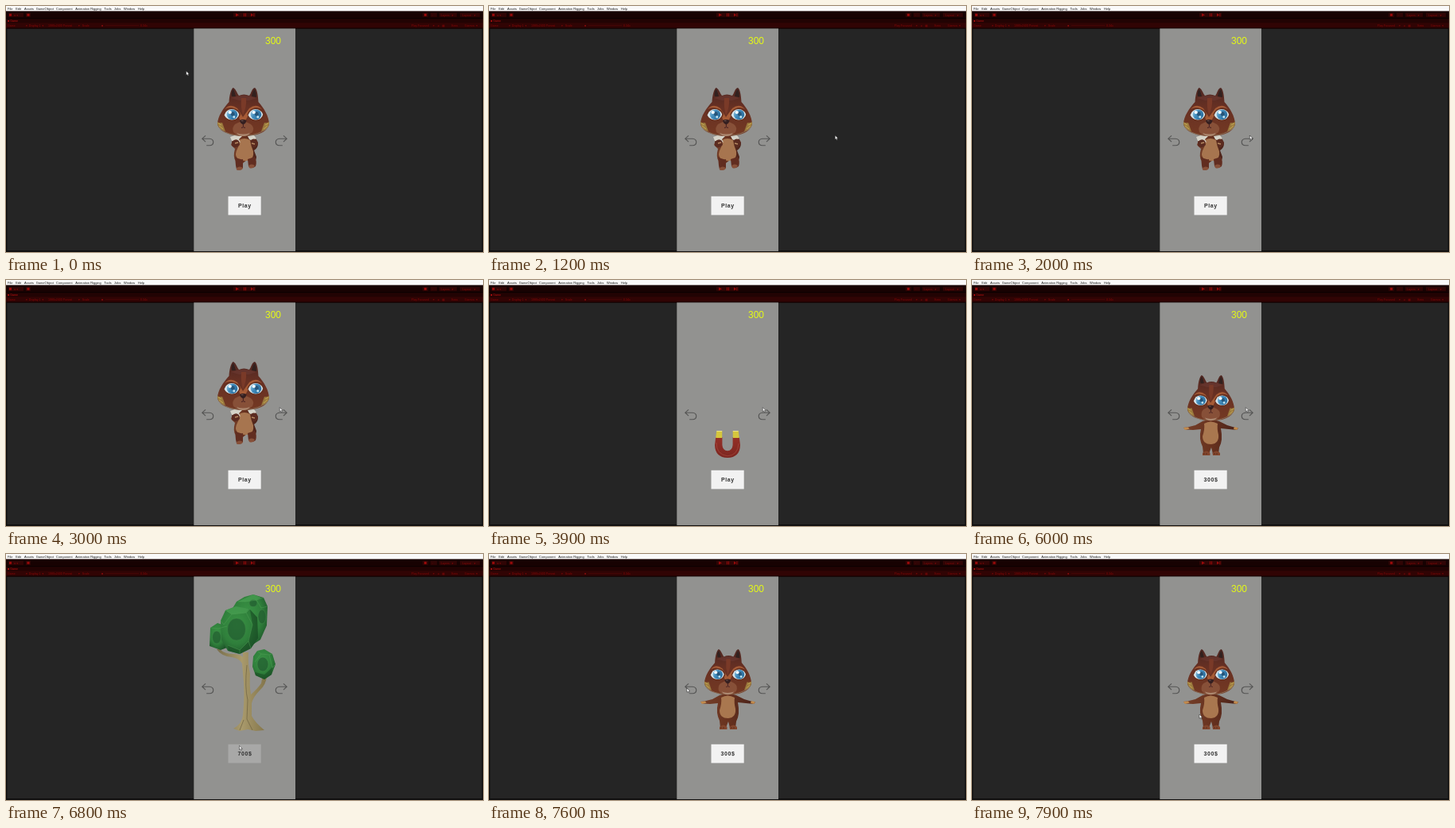
An HTML page that plays this animation: 600 px wide and 310 px high, repeating every 8000 ms.

```html
<!DOCTYPE html>
<html lang="en">
<head>
<meta charset="utf-8">
<title>Character shop</title>
<style>
  html, body { margin: 0; width: 100%; height: 100%; overflow: hidden; background: #252525; }
  svg { display: block; width: 600px; height: 310px; }
  text { font-family: "Liberation Sans", Arial, sans-serif; white-space: pre; }
  .menu { font: 4px "Open Sans", "Noto Sans", sans-serif; fill: #111; }
  .bar { font-size: 3.6px; fill: #850808; }
  .label { font-size: 7px; font-weight: 700; letter-spacing: .6px; text-anchor: middle; fill: #303030; }
  .item { display: none; }
</style>
</head>
<body>
<svg viewBox="0 0 600 310">
  <defs>
    <linearGradient id="fur" x2="0" y2="1">
      <stop offset="0" stop-color="#4d2722"/><stop offset=".4" stop-color="#673023"/><stop offset="1" stop-color="#743923"/>
    </linearGradient>
    <linearGradient id="limb">
      <stop offset="0" stop-color="#75402a"/><stop offset=".5" stop-color="#68321f"/><stop offset="1" stop-color="#472119"/>
    </linearGradient>
    <linearGradient id="iris" x2="1" y2=".5">
      <stop offset="0" stop-color="#9bd0e8"/><stop offset=".45" stop-color="#438dbd"/><stop offset="1" stop-color="#2a6f9f"/>
    </linearGradient>
    <linearGradient id="bark">
      <stop offset="0" stop-color="#786e4c"/><stop offset=".5" stop-color="#a99a6c"/><stop offset="1" stop-color="#827449"/>
    </linearGradient>
    <radialGradient id="leaf" cx=".43" cy=".38" r=".68">
      <stop offset="0" stop-color="#3a9445"/><stop offset=".6" stop-color="#2f7f3b"/><stop offset="1" stop-color="#1d5429"/>
    </radialGradient>
    <linearGradient id="steel" x2="0" y2="1">
      <stop offset="0" stop-color="#953027"/><stop offset="1" stop-color="#7c2620"/>
    </linearGradient>

    <g id="eye">
      <path d="M-10.5 0Q-8-8 1-8Q9-7 11 0Q9 8 0 8.5Q-8 8-10.5 0Z" fill="#65301f"/>
      <path d="M-9.4 1Q-7-6.5 0-6.5Q7-6 9.2 0Q8 6.5 0 7Q-7 6.5-9.4 1Z" fill="#d5e3e9"/>
      <ellipse cx=".5" cy=".3" rx="6.8" ry="6.4" fill="url(#iris)"/>
      <ellipse cx="1.3" cy="-.6" rx="2.4" ry="2.7" fill="#275579"/>
      <ellipse cx="-2.3" cy="-2.4" rx="2.2" ry="2" fill="#f2faff"/>
      <circle cx="2.8" cy="3.3" r="1.5" fill="#c5e7f5"/>
    </g>

    <g id="head">
      <path d="M280.5 121C281 112 283 105 285.5 103C289 104 290 109 293 113Q299 110 306 113C309 109 309 104 313 103C316 105 317 113 317.5 121C324 128 331 139 331 149C329 157 320 162 310 163Q299 165 287 163C277 161 268 157 266 149C266 139 274 128 280.5 121Z" fill="url(#fur)"/>
      <path d="M284 114Q283 107 286 105Q288 109 289 114ZM309 114Q310 107 313 105Q315 109 315 115Z" fill="#32211f"/>
      <path d="M283 116Q299 109 315 116L306 119H293Z" fill="#6a3731" opacity=".7"/>
      <path d="M266 146Q269 148 272 147L276 158Q268 156 266 149ZM331 146Q327 148 325 147L321 158Q329 156 331 149Z" fill="#9a793d"/>
      <path d="M268 151l5 4M329 151l-5 4M267 148l4 2M330 148l-4 2" stroke="#cfb45c" stroke-width=".8"/>
      <path d="M268 153Q274 160 287 162.5Q299 164 310 162.5Q324 159 329 153" fill="none" stroke="#999078" stroke-width=".9" opacity=".65"/>
      <path d="M275 130Q282 122 291 129L298 140L306 129Q315 122 322 130Q312 125 307 133L301 145H295L290 133Q284 125 275 130Z" fill="#a65b36"/>
      <path d="M296 116Q295 127 298 138Q303 127 302 116Z" fill="#7a3a28"/>
      <use href="#eye" x="284" y="136.5"/>
      <use href="#eye" x="314" y="136.5"/>
      <path d="M288 149Q298 142 308 149Q313 153 310 159Q306 163 298 163.5Q290 163 286 159Q284 153 288 149Z" fill="#875038"/>
      <path d="M290 160Q298 163 307 160Q304 164 298 164Q293 164 290 160Z" fill="#ac8870"/>
      <path d="M294 144Q298 142 302.5 144Q302 148 298.4 149.5Q294.5 148 294 144Z" fill="#341f20"/>
      <path d="M298.4 149V152M296 153.5Q298.5 152 301 153.5" fill="none" stroke="#451f20" stroke-width="1"/>
      <path d="M296 144.7h2.6" stroke="#8a7068" stroke-width=".7"/>
    </g>

    <path id="arrow" fill="none" stroke="#555554" stroke-width="1.15" d="M251 163.3L246.8 167.2L251 171.2M247 167.2H256Q260.7 167.5 260.7 171.5Q260.7 175.7 256 175.7H252.2"/>

    <g id="horseshoe">
      <path d="M285.2 198H293.4V208Q294 215 300 215.3Q306 215 306.6 208V198H314.8L316 208Q315.5 223.7 300 224Q284.5 223.7 284 208Z" fill="url(#steel)"/>
      <path d="M285.2 199L286.3 190H293.3L293.2 199ZM306.8 199L306.7 190H313.7L314.8 199Z" fill="#d5c63d"/>
      <path d="M286.4 190.5h6.7M306.9 190.5h6.7" stroke="#ebe48a"/>
      <path d="M286 205Q286 220 300 221.8Q313 221 314 206" fill="none" stroke="#b45449" stroke-width=".8" opacity=".65"/>
    </g>
  </defs>

  <rect width="600" height="310" fill="#252525"/>
  <rect y="6" width="600" height="22.5" fill="#170202"/>
  <rect y="15.7" width="600" height="5.5" fill="#220303"/>
  <rect y="21.2" width="600" height="7" fill="#310404"/>
  <path d="M0 15.6H600M0 28H600" stroke="#080000" stroke-width=".8"/>
  <rect width="600" height="6.4" fill="#fafafa"/>
  <path d="M.5 28V310M599.5 28V310M0 309H600" stroke="#0b0a0a" stroke-width="1.5"/>
  <g id="menu" class="menu"></g>
  <g class="bar">
    <path d="M3 8.7h19v5H3ZM25 8.7h6v5h-6ZM286 8.7h28v5h-28ZM524 8.7h7v5h-7ZM534 8.7h8v5h-8ZM545 8.7h22v5h-22ZM571 8.7h25v5h-25Z" fill="#300505"/>
    <path d="M4 9.7h3v3H4ZM26.5 9.7h3v3h-3ZM289 9.3l4 2-4 2ZM299 9.3h1v4h-1ZM301 9.3h1v4h-1ZM308 9.3l3 2-3 2ZM311.5 9.3h.8v4h-.8ZM526 9.7h3v3h-3Z" fill="#9a0a0a"/>
    <text x="10" y="12.6">● ▾</text>
    <text x="536" y="12.6">◦</text>
    <text x="547" y="12.6">Layers   ▾</text>
    <text x="574" y="12.6">Layout    ▾</text>
    <text x="2" y="20" fill="#c51212">■ Game</text>
    <text x="2" y="25.8">Game</text>
    <text x="25" y="25.8">▾  Display 1  ▾</text>
    <text x="53" y="25.8">1080x2400 Portrait</text>
    <text x="91" y="25.8">▾   Scale</text>
    <text x="120" y="25.8" fill="#c51212">●</text>
    <path d="M125 24.5h42" stroke="#4b0707" stroke-width=".7"/>
    <text x="169" y="25.8">0.34x</text>
    <text x="510" y="25.8">Play Focused</text>
    <text x="537" y="25.8">▾    ◂    ▦</text>
    <text x="560" y="25.8">Stats</text>
    <text x="577" y="25.8">Gizmos  ▾</text>
  </g>

  <rect x="236.3" y="28.4" width="127.7" height="280.6" fill="#929290"/>
  <text x="326" y="47.6" font-size="12" fill="#e5fa14">300</text>

  <g class="item" id="idle">
    <path d="M286 166Q299 160 314 166L317 173Q317 179 312 182L315 190Q315 195 311 197L303 194L298 198Q293 199 289 195Q285 191 288 180L283 175Z" fill="url(#limb)"/>
    <path d="M293 169Q300 165 307 169Q308 176 311 183Q312 191 307 194Q299 197 291 192Q287 187 291 180Q294 175 293 169Z" fill="#a7754f"/>
    <path d="M282 165L288 163L297 164L293 168L295 172L290 170L284 170ZM304 164L312 163L315 167L310 170L306 168Z" fill="#d5d3c8"/>
    <path d="M284 171Q289 166 293 170L294 175Q289 181 284 176ZM308 169Q314 165 317 172Q316 179 310 178Z" fill="#5b2b20"/>
    <path d="M288 173l4-1M309 173l4 1" stroke="#b68962" stroke-width="1.3"/>
    <path d="M288 190Q293 194 298 193L298 204Q295 208 290 206L289 201ZM304 193L313 190Q316 196 314 202Q309 206 305 202Z" fill="#612d20"/>
    <path d="M290 204Q294 201 298 204Q297 208 290 206.5ZM305 201Q309 198 313 201Q311 206 306 204Z" fill="#875039"/>
    <use href="#head"/>
  </g>

  <g class="item" id="magnet"><use href="#horseshoe"/></g>
  <g class="item" id="bigMagnet"><use href="#horseshoe" transform="translate(300 226) scale(1.42) translate(-300 -224)"/></g>

  <g class="item" id="pose">
    <path d="M290 178Q301 174 311 178L321 183L331 186L335 186.5L333 189L323 188L313 187Q316 202 311 211L310 219H303L301 211L298 219H291L290 210Q285 200 288 188L278 189L268 188.5L266 186L271 185.5L281 183Z" fill="url(#limb)"/>
    <path d="M266 186l6-.5 1.5 2-5.5 1.5ZM330 185l5 1.5-2 2.5-4-1Z" fill="#c28b4d"/>
    <path d="M292 181Q300 176 309 181Q308 187 310 195Q311 206 301 207Q290 207 290 197Q293 188 292 181Z" fill="#a9774f"/>
    <path d="M290 218Q295 213 299.5 218V221H290ZM302.5 218Q308 213 312 218V221H303Z" fill="#82452c"/>
    <path d="M292 220v-2M295 220v-2M305 220v-2M308 220v-2" stroke="#3f2018" stroke-width=".6"/>
    <use href="#head" transform="translate(300.5 120) scale(.91 .94) translate(-298.5 -103)"/>
  </g>

  <g class="item" id="tree">
    <path d="M298 124H305Q304 138 307 151Q306 165 308 177Q317 169 321 163L323 152L328 154Q327 165 319 172Q311 180 309 188L309 204Q313 212 325 222L314 223L304 221L294 223L286 220Q297 214 298 203Q301 175 298 150L297 138Q293 131 284 130Q271 129 265 120L269 120Q275 126 286 126Q294 126 298 130Z" fill="url(#bark)"/>
    <path d="M303 140Q300 168 304 184L303 208L310 222M299 209L294 222" fill="none" stroke="#665c3d" stroke-width=".9" opacity=".7"/>
    <path d="M257 93L266 87L278 91V118L270 121L256 116Z" fill="url(#leaf)"/>
    <path d="M284 70L290 60L300 54L311 51L324 55L329 66L328 90L320 108L306 117L291 101Z" fill="url(#leaf)"/>
    <path d="M270 84L276 71L289 66L306 69L316 80L317 106L308 119L294 126L279 122L271 108Z" fill="url(#leaf)"/>
    <path d="M311 129L316 122L325 120L335 126L339 139L334 152L325 158L314 153L310 142Z" fill="url(#leaf)"/>
    <path d="M307 70L316 80L317 106L308 119L305 109L310 89ZM279 115L294 121L305 110L308 119L294 126L280 122ZM313 149L325 152L335 143L334 152L325 158L314 153Z" fill="#184b24" opacity=".55"/>
    <path d="M276 71L289 66L306 69L302 74L284 76ZM292 60L311 51L321 55L315 58L301 60Z" fill="#4ba253" opacity=".65"/>
    <g fill="#235f31" opacity=".75" stroke="#499350" stroke-width=".45">
      <ellipse cx="290" cy="95" rx="11.5" ry="14"/><ellipse cx="311" cy="62" rx="5" ry="4.6"/>
      <ellipse cx="322" cy="79" rx="5" ry="9"/><ellipse cx="265" cy="105" rx="5.5" ry="8"/>
      <ellipse cx="323" cy="139" rx="7" ry="9"/>
    </g>
    <path d="M277 71L284 76L302 74L307 69M302 74L310 89L305 110L308 119M284 76L274 89M274 89L270 84M305 110L294 121L279 115M294 121V126M292 60L301 60L315 58L324 55M315 58L321 68L329 66M257 93L267 94L278 91M316 122L321 126L331 127L335 126M331 127L335 143L339 139M321 126L313 136" fill="none" stroke="#54a55a" stroke-width=".65" opacity=".65"/>
  </g>

  <use href="#arrow"/>
  <use href="#arrow" transform="translate(600 0) scale(-1 1)"/>
  <rect id="button" x="279.5" y="239.8" width="41.2" height="23.6"/>
  <text id="label" class="label" x="300.4" y="254.1"></text>
  <path id="cursor" d="M0 0V5.2L1.2 4.2L2.1 6L3 5.6L2.2 3.8H3.8Z" fill="#fff" stroke="#151515" stroke-width=".45"/>
</svg>
<script>
  const LOOP = 8000, STEP = 100;
  const $ = id => document.getElementById(id);

  const menu = [["File", 2], ["Edit", 12.2], ["Assets", 23], ["GameObject", 37.7], ["Component", 63],
    ["Animation Rigging", 87.3], ["Tools", 123.4], ["Jobs", 136], ["Window", 148], ["Help", 166]];
  for (const [word, x] of menu) {
    const el = document.createElementNS("http://www.w3.org/2000/svg", "text");
    el.setAttribute("x", x);
    el.setAttribute("y", 4.5);
    el.textContent = word;
    $("menu").append(el);
  }

  // time, item, button label
  const scenes = [[0, "idle", "Play"], [3100, "magnet", "Play"], [4100, "bigMagnet", "Play"],
    [5100, "pose", "300$"], [6100, "tree", "700$"], [7600, "pose", "300$"]];

  // time, x, y of the pointer tip
  const path = [[0, 226.7, 82], [300, 298, 106], [600, 396, 148], [900, 441, 166], [1200, 435.3, 163],
    [1500, 435.3, 163], [1800, 351, 163], [2300, 347, 163], [2600, 344.3, 160.6], [6400, 344.3, 160.6],
    [6600, 325, 200], [6800, 293.5, 241.5], [7000, 292, 246], [7200, 273, 209], [7300, 259, 180],
    [7400, 249, 169], [7600, 249, 169], [7900, 286, 202]];

  function pointer(t) {
    const i = path.findIndex(p => p[0] > t);
    if (i < 0) return path[path.length - 1].slice(1);
    const [a, b] = [path[i - 1], path[i]];
    const k = (t - a[0]) / (b[0] - a[0]);
    return [a[1] + (b[1] - a[1]) * k, a[2] + (b[2] - a[2]) * k];
  }

  function draw(t) {
    const [, item, label] = scenes.filter(s => s[0] <= t).pop();
    document.querySelectorAll(".item").forEach(el => el.style.display = el.id === item ? "inline" : "none");
    $("label").textContent = label;
    $("button").setAttribute("fill", item === "tree" ? "#a8a8a7" : "#f2f2f2");
    $("cursor").setAttribute("transform", `translate(${pointer(t)})`);
  }

  const start = performance.now();
  function tick() {
    const t = (performance.now() - start) % LOOP;
    draw(Math.floor(t / STEP) * STEP);
    requestAnimationFrame(tick);
  }
  tick();
</script>
</body>
</html>
```
